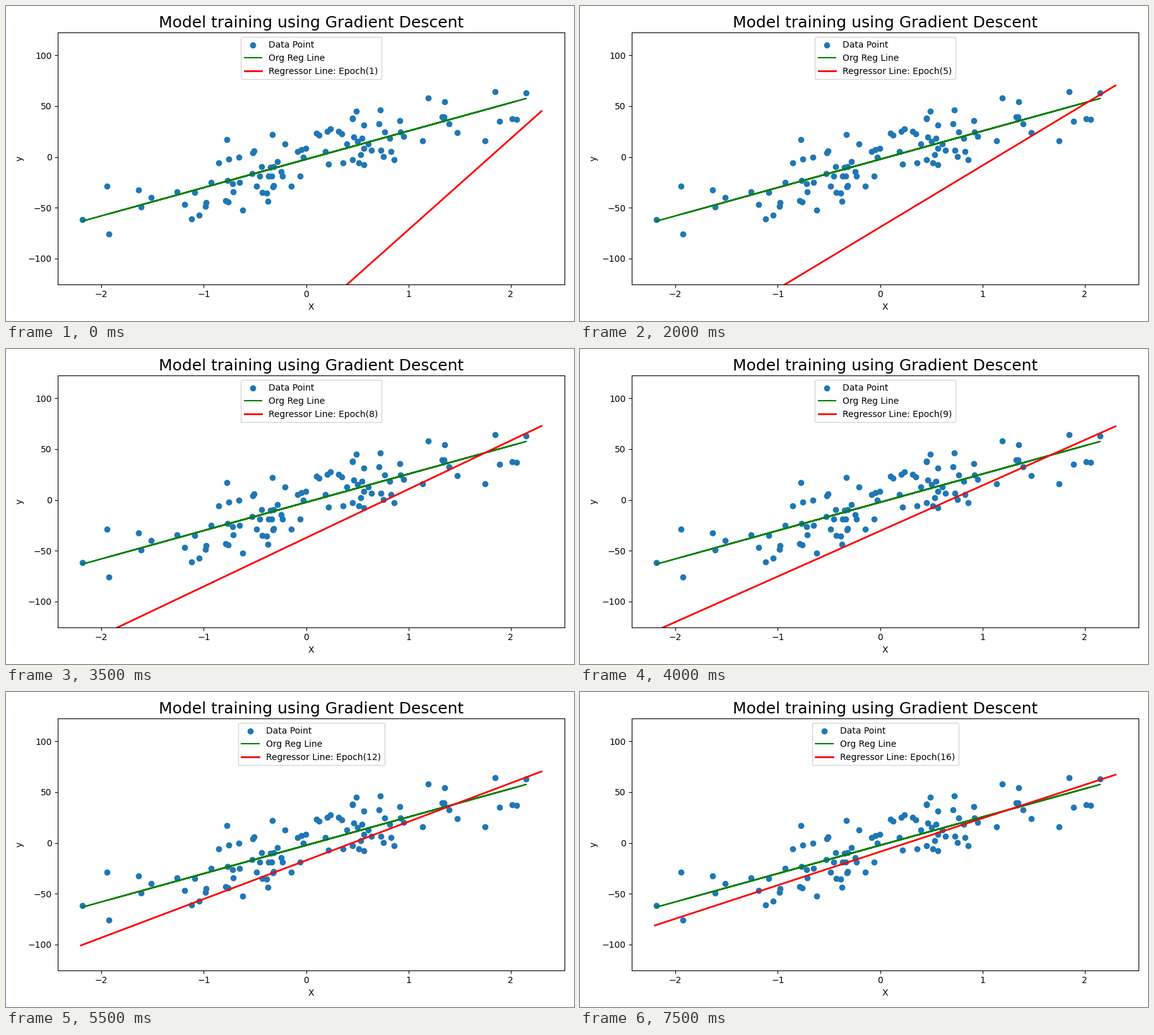
These frames come from a looping animation (900 by 500 pixels, 8 s). A matplotlib script:

```python
import numpy as np
import matplotlib.pyplot as plt
from matplotlib.animation import FuncAnimation

EPOCHS = 16
RATE = 0.001


def make_data(n=100, noise=20, seed=13):
    """Shuffled noisy samples of a random line through the origin."""
    rng = np.random.RandomState(seed)
    x = rng.standard_normal(n)
    y = 100 * rng.uniform() * x
    y += rng.normal(scale=noise, size=n)
    order = np.arange(n)
    rng.shuffle(order)
    return x[order], y[order]


def descend(x, y, m=100.0, b=-200.0):
    """Slope and intercept after each epoch of batch gradient descent."""
    steps = []
    for _ in range(EPOCHS):
        err = y - m * x - b
        m, b = m + 2 * RATE * np.sum(err * x), b + 2 * RATE * np.sum(err)
        steps.append((m, b))
    return steps


x, y = make_data()
slope, intercept = np.polyfit(x, y, 1)
steps = descend(x, y)
span = np.array([-2.2, 2.3])

plt.rcParams["font.family"] = "DejaVu Sans"
fig, ax = plt.subplots(figsize=(9, 5), dpi=100)
ax.scatter(x, y, label="Data Point")
# Samples are unsorted, so the line is traced back and forth.
ax.plot(x, slope * x + intercept, color="green", label="Org Reg Line")
line, = ax.plot(span, 50 * span - 4, color="red", linewidth=2,
                label="Regressor Line: Epoch(1)")
ax.set_xlim(-2.425, 2.525)
ax.set_ylim(-125.25, 122.25)
ax.set_xlabel("X")
ax.set_ylabel("y")
ax.set_title("Model training using Gradient Descent", fontsize=18)
legend = ax.legend(loc="upper center")
fig.tight_layout()


def update(i):
    m, b = steps[i]
    line.set_ydata(m * span + b)
    legend.get_texts()[2].set_text(f"Regressor Line: Epoch({i + 1})")
    return line, legend


anim = FuncAnimation(fig, update, frames=EPOCHS, interval=500, repeat=True)
plt.show()
```
